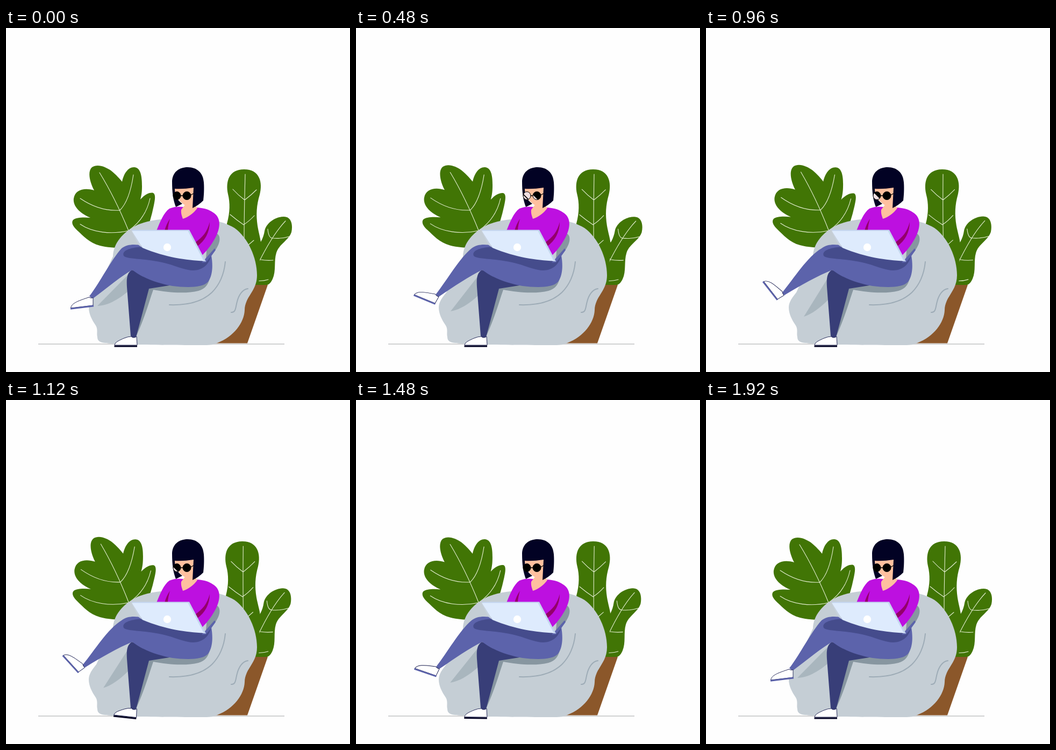
An HTML page that plays this animation: 640x640 px, repeating every 1960 ms.

```html
<!DOCTYPE html>
<html lang="en">
<head>
<meta charset="utf-8">
<title>Relaxing with a laptop</title>
<style>
  html, body { margin: 0; width: 100%; height: 100%; overflow: hidden; background: #fefefe; }
  svg { display: block; width: 100vw; height: 100vh; }
  .leaf { fill: #417505; }
  .vein { fill: none; stroke: #e4eed2; stroke-width: 1.1; stroke-linecap: round; }
  .crease { fill: none; stroke: #9dabb6; stroke-width: 2; stroke-linecap: round; }
  .shoe { fill: #fff; stroke: #171b4d; stroke-width: .9; stroke-linejoin: round; }
  .hair { fill: #020224; }
  .skin { fill: #ffc09f; }
  .fold { fill: #93006a; }
</style>
</head>
<body>
<svg viewBox="0 0 640 640">
  <defs>
    <clipPath id="lenses">
      <ellipse cx="318" cy="312" rx="7" ry="7.4"/>
      <circle cx="336.5" cy="312" r="7.5"/>
    </clipPath>
  </defs>
  <path d="M60,588H518" stroke="#d0d1d2" stroke-width="2"/>

  <g id="leftLeaf">
    <path class="leaf" d="M240,409C215,410 190,409 175,405C155,400 143,386 133,377C124,369 121,362 125,357C131,352 145,352 157,353C138,345 124,332 126,317C129,299 148,297 164,302C156,287 151,267 160,259C170,252 185,258 195,265C205,273 212,281 216,286C219,271 227,259 238,259C252,259 253,280 253,294C253,305 252,311 250,319C257,311 267,305 274,307C279,310 277,320 275,330C271,350 265,370 257,390Z"/>
    <path class="vein" d="M174,269C190,295 207,326 228,377M138,317C160,332 185,341 212,339C226,325 233,300 237,273M138,365C160,380 195,385 228,377C248,363 262,345 268,317"/>
  </g>

  <g id="smallLeaf">
    <path class="leaf" d="M474,398C478,391 480,384 481,378C484,362 502,351 517,351C531,351 534,366 531,380C526,395 508,402 503,418C498,434 503,452 496,467C492,476 487,479 480,479H455V410Z"/>
    <path class="vein" d="M520,359C500,380 480,415 464,449M487,374C488,386 491,391 496,391C506,392 517,391 527,388M468,416C468,426 470,430 474,431Q485,433 497,432M463,470C472,471 482,470 488,468"/>
  </g>
  <g id="tallLeaf">
    <path class="leaf" d="M411,364C417,343 417,325 413,309C408,285 415,263 443,263C472,263 478,287 472,310C466,330 465,347 468,368C470,380 473,390 474,398L470,480H430Z"/>
    <path class="vein" d="M445,272C444,310 443,345 443,402M422,300Q432,311 444,320Q456,311 466,301M417,347Q430,358 442,366Q453,359 462,349M461,395L448,406"/>
  </g>
  <path d="M440,478H487L449,586.5H385Z" fill="#8b572a"/>

  <path fill="#c5ced5" d="M199,425C200,400 217,380 245,366C270,356 300,354 330,354C370,354 400,357 425,372C450,390 467,427 467,460C467,490 444,500 444,525C443,548 424,574 393,586C388,589 380,590 370,590C330,590 250,590 195,587C180,586 170,585 170,575C168,568 172,560 166,552C160,543 154,532 154,520C154,510 160,502 168,492Z"/>
  <path class="crease" d="M304,515C332,516 362,512 383,492C400,475 406,455 408,435M419,529C428,530 427,519 430,509C433,497 440,486 450,485"/>
  <path fill="#8796a0" d="M375,385C394,376 399,386 397,397C395,406 390,413 382,424L372,430Z"/>
  <path fill="#8796a0" d="M241,576L266,483L380,462C377,476 372,485 358,489C335,495 300,492 274,487C266,510 256,545 241,576Z"/>
  <path id="legShade" fill="#a9b6be"/>

  <path fill="#383e78" d="M234,450C225,456 224,466 225,482L232,573Q237,579 242,575L266,485L310,478Z"/>
  <g id="backShoe">
    <path class="shoe" d="M202,590C203,584 211,581 220,577Q227,574 233,574Q237,578 243,574L244,590Z"/>
    <path d="M201.5,592H244" stroke="#020224" stroke-width="3"/>
  </g>

  <path id="frontLeg" fill="#5c63ab"/>
  <path fill="#454c8c" d="M219,424C215,415 229,408 256,407L370,434L382,420C381,432 373,445 360,449C343,455 326,446 302,439C262,428 226,431 219,424Z"/>
  <path fill="#5c63ab" d="M364,437L388,410L390,413L382,424L372,436Z"/>
  <g id="frontShoe">
    <path class="shoe" d="M120.5,521C122,511 137,507 154,501Q158,503 162,502V516Z"/>
    <path d="M120,522.3L163,517" stroke="#5c63ab" stroke-width="2.8"/>
  </g>

  <path fill="#bd10e0" d="M280,377C287,360 293,344 304,336C313,332 322,332 330,333L355,334C370,335 378,338 385,343C400,352 399,369 392,385C385,400 375,413 365,423L335,395Z"/>
  <path class="skin" d="M333,329L326,338C325,346 328,351 329,355C339,352 350,344 356,335L346,322Z"/>
  <path class="fold" d="M305,355C300,362 297,370 295,377H301C301,370 303,362 305,355Z"/>
  <path class="fold" d="M379,361C374,380 366,389 352,399L356,406C370,396 379,380 379,361Z"/>

  <path class="skin" d="M313,297H350V326C345,334 335,332 329,327C320,320 314,311 313,297Z"/>
  <path class="hair" d="M309,285C310,268 322,259 338,259C356,259 367,270 368,287C369,300 368,313 367,321Q358,330 347,335L349,297Q330,300 314,299C314,311 319,321 328,327L316,333C311,320 309,307 309,285Z"/>
  <path d="M324,312H331M343,311L349,308" stroke="#000" stroke-width="1.3"/>
  <g clip-path="url(#lenses)">
    <path d="M300,300H350V325H300Z"/>
    <path id="glint" fill="#f0dfe2" d="M-50,-20H-20L20,20H-50Z"/>
    <path id="glintGap" d="M-1.2,0L-21.2,-20H-18.8L21.2,20H18.8Z"/>
  </g>
  <g fill="none" stroke="#000">
    <ellipse cx="318" cy="312" rx="7" ry="7.4"/>
    <circle cx="336.5" cy="312" r="7.5"/>
  </g>

  <path fill="#c3d5ef" d="M232,375.5H341L372,434.5L367,434Z"/>
  <path fill="#deebfd" d="M234,377.5H338.5L368,433.5C335,432 297,427 254,409Z"/>
  <path fill="#c8d3e0" d="M232,376L254,409L247,404Z"/>
  <circle cx="300" cy="408" r="7.2" fill="#fff"/>
</svg>
<script>
const LOOP = 1960, STEP = 40, SWING = 1920, TAP = 480;
const el = id => document.getElementById(id);
const smooth = x => x * x * (3 - 2 * x);
const clamp = x => Math.min(1, Math.max(0, x));
const mix = (a, b, k) => a + (b - a) * k;

// Eased there-and-back movement, 0 to 1 to 0 in each period
const sway = (t, period) => smooth(1 - Math.abs(1 - 2 * (t % period) / period));

const morphs = {
  frontLeg: [
    "M155,499C175,473 195,432 215,410C227,401 242,402 260,406L368,434L382,423C385,440 385,460 376,472C366,484 335,483 310,480C285,476 255,466 235,450C215,461 190,482 162,503Q158,502 155,499Z",
    "M142,492C164,465 189,425 215,410C227,401 242,402 260,406L368,434L382,423C385,440 385,460 376,472C366,484 335,483 310,480C285,476 255,466 235,450C208,461 177,478 146,497Q143,496 142,492Z"
  ],
  legShade: [
    "M236,450L170,517C190,517 212,503 228,489Z",
    "M236,450L182,537C198,532 214,519 228,505Z"
  ]
};

function morph(id, k) {
  const [from, to] = morphs[id];
  const ends = to.match(/[\d.]+/g);
  let i = 0;
  el(id).setAttribute("d", from.replace(/[\d.]+/g, n => mix(+n, +ends[i++], k).toFixed(2)));
}

const transform = (id, value) => el(id).setAttribute("transform", value);
const rotate = (id, angle, x, y) => transform(id, `rotate(${angle} ${x} ${y})`);

function glintEdge(t) {
  if (t < 300) return mix(304, 335, smooth(clamp((t - 80) / 200)));
  const u = (t - 280) / 1000;
  return 335 - 20 * u - 8 * u * u;
}

function draw(t) {
  const swing = sway(t, SWING);
  rotate("leftLeaf", 1.1 * swing, 230, 400);
  rotate("tallLeaf", -1.1 * swing, 445, 480);
  rotate("smallLeaf", 0.7 * (Math.cos(2 * Math.PI * (t - 340) / SWING) - 0.44), 475, 480);
  morph("frontLeg", swing);
  morph("legShade", swing);
  transform("frontShoe", `translate(${-15 * swing} ${-8 * swing}) rotate(${59 * swing} 158 502)`);
  rotate("backShoe", 8.5 * sway(t, TAP), 238, 577);

  const edge = glintEdge(t);
  const shown = t >= 80 && t < 1270 ? "inline" : "none";
  for (const id of ["glint", "glintGap"]) el(id).setAttribute("display", shown);
  transform("glint", `translate(${edge} 312)`);
  transform("glintGap", `translate(${edge - 17} 312)`);
}

const start = performance.now();
function tick() {
  const t = (performance.now() - start) % LOOP;
  draw(Math.floor(t / STEP) * STEP);
  requestAnimationFrame(tick);
}
tick();
</script>
</body>
</html>
```
